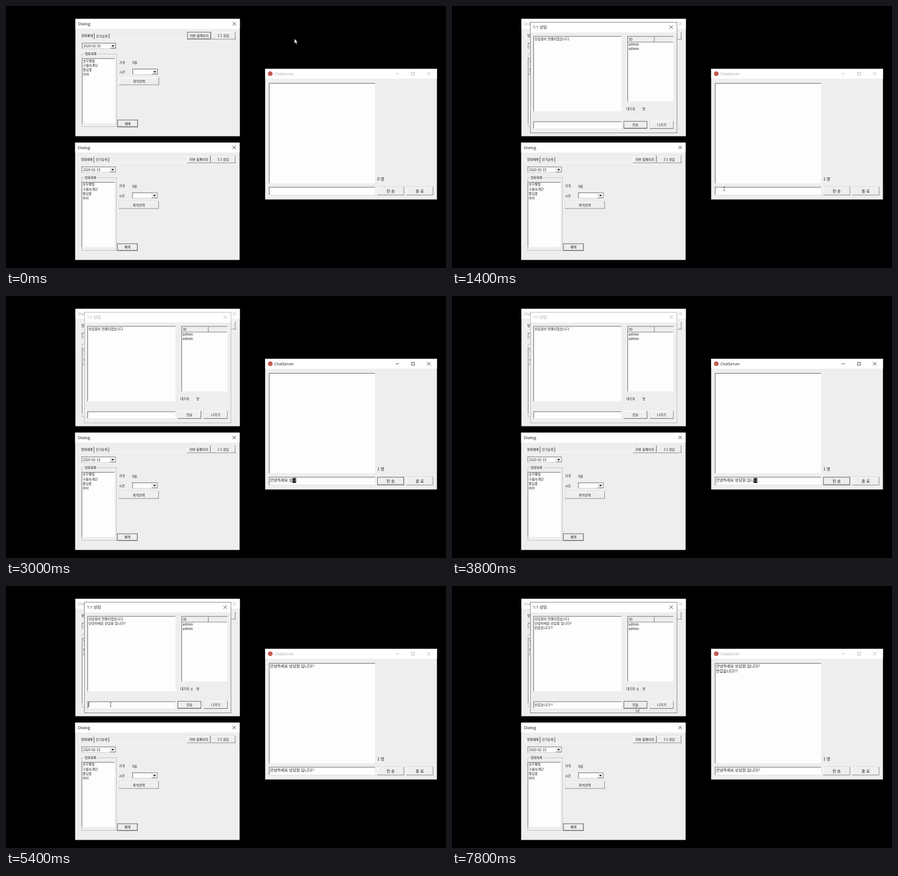
Write an HTML page that moves like this. It is 800 px wide and 476 px high and loops after 8 s.

```html
<!DOCTYPE html>
<html lang="ko">
<head>
<meta charset="utf-8">
<title>Chat windows</title>
<style>
  html, body { margin: 0; width: 100%; height: 100%; overflow: hidden; background: #000; }
  svg { display: block; width: 100%; height: 100%; }
  text { font-family: 'Noto Sans CJK KR', 'Noto Sans CJK', sans-serif; white-space: pre; }
  .title { font-family: 'Open Sans', 'Noto Sans CJK KR', sans-serif; }
</style>
</head>
<body>
<svg id="stage" viewBox="0 0 800 476"></svg>
<script>
const STEP = 200, STEPS = 40;
const FACE = '#eee', INK = '#1a1a1a', EDGE = '#6b6b6b', FADED = '#a5a5a5';
const SMALL = 5.9, LARGE = 7.1;
const GREETING = '안녕하세요 상담원 입니다!!', REPLY = '반갑습니다!!!';

// Typed text by step; "true" marks a highlighted last syllable.
const greetingKeys = [
  [11, 'ㅇ', true], [12, '안', true], [13, '안녕', true], [14, '안녕하세', true],
  [15, '안녕하세요 상다', true], [16, '안녕하세요 상담원', true], [17, '안녕하세요 상담원 이', true],
  [18, '안녕하세요 상담원 입니', true], [19, '안녕하세요 상담원 입니다', true],
  [20, '안녕하세요 상담원 입니다!'], [21, GREETING]
];
const replyKeys = [
  [30, 'ㅂ', true], [31, '반가', true], [32, '반갑스', true], [33, '반갑습니', true],
  [34, '반갑습니다', true], [35, '반갑습니다!!'], [36, REPLY]
];
// Pointer waypoints as [step, x, y]; hidden while typing.
const pointerPaths = [
  { shape: 'arrow', points: [[0, 524.5, 59.5], [2, 400, 54], [3, 400, 54], [6, 503, 348]] },
  { shape: 'beam', points: [[7, 495, 332], [10, 495, 332]] },
  { shape: 'arrow', points: [[21, 719, 359], [23, 710, 342], [24, 710, 342], [25, 430, 272]] },
  { shape: 'beam', points: [[26, 190.5, 215.5], [29, 190.5, 215.5]] },
  { shape: 'arrow', points: [[36, 388, 211], [38, 335, 219.5], [39, 335, 219.5]] }
];

const rect = (x, y, w, h, fill) =>
  `<rect x="${x}" y="${y}" width="${w}" height="${h}" fill="${fill}"/>`;
const path = (d, attrs) => `<path d="${d}" ${attrs}/>`;
const text = (x, y, str, size = SMALL, fill = INK, attrs = '') =>
  `<text x="${x}" y="${y}" font-size="${size}" fill="${fill}" ${attrs}>${str}</text>`;
const title = (x, y, str, size, active) =>
  text(x, y, str, size, active ? INK : FADED, 'class="title"');

const frame = (x, y, w, h, color) =>
  rect(x, y, w, 1, color) + rect(x, y + h - 1, w, 1, color) +
  rect(x, y, 1, h, color) + rect(x + w - 1, y, 1, h, color);

const sunken = (x, y, w, h) =>
  rect(x, y, w, h, '#fdfdfd') + rect(x, y, w, 1, EDGE) + rect(x, y, 1, h, EDGE);

const raised = (x, y, w, h) =>
  rect(x, y, w, h, EDGE) + rect(x, y, w - 1, h - 1, '#fff') + rect(x + 1, y + 1, w - 2, h - 2, FACE);

const button = (x, y, w, h, label, isDefault, size = SMALL) =>
  raised(x, y, w, h) +
  (isDefault ? frame(x, y, w, h, EDGE) + rect(x + 1, y + h - 2, w - 2, 1, '#aaa') : '') +
  text(x + w / 2, y + h / 2 + size * .36, label, size, INK, 'text-anchor="middle"');

function combo(x, y, w, label) {
  const cx = x + w - 5.5;
  return sunken(x, y, w, 11) + rect(x, y + 10, w, 1, '#ccc') + raised(x + w - 10, y + 1, 10, 9) +
    path(`M${cx - 2.5} ${y + 4.5}h5l-2.5 2.8z`, 'fill="#000"') + text(x + 2.5, y + 8, label, 6.2);
}

const closeMark = (x, y, active) =>
  path(`M${x - 3} ${y - 3}l6 6m0-6l-6 6`, `stroke="${active ? INK : FADED}" stroke-width=".8" fill="none"`);

const windowBox = (x, y, w, h, titleHeight) =>
  rect(x, y, w, h, FACE) + rect(x, y, w, titleHeight, '#fff');

const advance = (str, size) => size *
  [...str].reduce((sum, c) => sum + (c === ' ' ? .224 : c === '!' ? .325 : .92), 0);

function typed(x, y, size, key) {
  if (!key) return '';
  const [, str, composing] = key;
  if (!composing) return text(x, y, str, size);
  const head = str.slice(0, -1), last = str.slice(-1), at = x + advance(head, size);
  return text(x, y, head, size) + rect(at, y - size * .94, advance(last, size), size * 1.25, '#000') +
    text(at, y, last, size, '#fff');
}

const latest = (keys, step) => keys.filter(k => k[0] <= step).pop();

function bookingDialog(dx, dy, active, focused) {
  const films = ['호두별빛', '구름속계단', '돌담꽃', '아아'];
  return `<g transform="translate(${dx} ${dy})">` +
    windowBox(126.2, 23.4, 299, 213.2, 18) +
    title(131, 35, 'Dialog', 7.6, active) + closeMark(415.3, 32.3, active) +
    rect(134, 49, 1, 11, '#fff') + rect(188, 59, 230, 1, '#fafafa') + rect(417, 59, 1, 2, '#bbb') +
    text(136.7, 56, '영화예매', 5.8) + rect(160, 49, 1, 11, '#555') +
    text(163.8, 56.5, '인기순위', 5.8) + rect(187, 50, 1, 9, '#555') +
    button(329.5, 47, 43, 13.5, '리뷰 홈페이지', focused) + button(373.7, 47, 43.5, 13.5, '1:1 상담') +
    combo(138, 67, 62, '2020-02-15') +
    frame(139, 88, 64, 133, '#fff') + frame(138, 87, 64, 133, '#b8b8b8') +
    rect(142, 85, 25, 5, FACE) + text(143.5, 89, '영화목록', 5.8) +
    sunken(138, 95, 60, 118) +
    films.map((film, i) => text(140, 101.5 + i * 8.3, film)).join('') +
    text(206, 104.5, '가격', 5.7) + text(230, 104.8, '0원') +
    text(206, 121.8, '시간', 5.7) + combo(230, 114, 46, '') +
    button(206, 130, 72.2, 13.5, '좌석선택') + button(202.7, 206.7, 37, 13.5, '예매', true) +
    '</g>';
}

function chatDialog(step, active) {
  const lines = [[4, '상담원이 연결되었습니다.'], [24, GREETING], [38, REPLY]];
  return windowBox(142, 29, 267.5, 202, 19) + frame(142, 29, 267.5, 202, active ? '#888' : '#bbb') +
    title(147, 41.3, '1:1 상담', 7.3, active) + closeMark(398.5, 38.5, active) +
    sunken(148, 54.7, 160, 136.5) +
    lines.filter(l => l[0] <= step).map((l, i) => text(150, 61.5 + i * 8, l[1], 6)).join('') +
    sunken(319, 54.7, 83.5, 118.5) + rect(320, 56, 82, 9, FACE) +
    rect(320, 65, 82, 1, '#888') + rect(367.3, 56, 1, 9, '#777') +
    text(322, 63, 'ID', 6.2) + text(321, 72, 'admin', 6.3) + text(321, 80.3, 'admin', 6.3) +
    text(317, 189.3, '대기자', 5.8) + (step >= 24 ? text(336, 189.5, '0', 6.2) : '') + text(346, 189.3, '명', 5.8) +
    sunken(148, 209.7, 160, 12.5) +
    button(312, 209, 43, 14, '전송', active) + button(359.7, 209, 43, 14, '나가기') +
    (active && step >= 26 && step < 30 ? rect(150, 211, 1, 9, '#222') : '') +
    typed(150, 217.5, 6, latest(replyKeys, step));
}

function serverWindow(step, active) {
  const color = active ? INK : FADED, count = step >= 4 ? 1 : 0;
  const lines = [[24, GREETING], [38, REPLY]];
  return windowBox(471.2, 114, 312.3, 237.5, 18) +
    '<circle cx="480.5" cy="123" r="4.3" fill="#c45a50"/>' +
    title(488, 125.7, 'ChatServer', 6.9, active) +
    path('M708.5 123h6M737.4 120.4h5.2v5.2h-5.2z', `stroke="${color}" stroke-width=".8" fill="none"`) +
    closeMark(768.5, 123, active) +
    sunken(478, 140, 193, 182) +
    lines.filter(l => l[0] <= step).map((l, i) => text(480, 148 + i * 8.7, l[1], LARGE)).join('') +
    text(675, 317.3, count + ' 명', 7.3) +
    sunken(478, 328.7, 193, 15) + rect(478, 343, 193, 1, '#ddd') +
    button(675, 328.7, 48.7, 15, '전 송', active, LARGE) + button(728, 328.7, 48.7, 15, '종 료', false, LARGE) +
    (active && step < 11 ? rect(480, 331, 1, 9, '#222') : '') +
    typed(480, 337.3, LARGE, latest(greetingKeys, step));
}

function pointer(step) {
  const route = pointerPaths.find(({ points }) => step >= points[0][0] && step <= points[points.length - 1][0]);
  if (!route) return '';
  const i = Math.max(1, route.points.findIndex(p => p[0] >= step));
  const [s0, x0, y0] = route.points[i - 1], [s1, x1, y1] = route.points[i];
  const k = (step - s0) / (s1 - s0);
  const x = x0 + (x1 - x0) * k, y = y0 + (y1 - y0) * k;
  return route.shape === 'arrow'
    ? path(`M${x} ${y}v8.5l1.9-1.7 1.3 3.1 1.5-.6-1.3-3h2.5z`, 'fill="#fff" stroke="#222" stroke-width=".6"')
    : path(`M${x - 1.5} ${y - 3.7}h3m-1.5 0v7.4m-1.5 0h3`, 'fill="none" stroke="#444" stroke-width=".7"');
}

function draw(step) {
  const chatOpen = step >= 3, serverActive = step >= 8 && step < 26;
  return rect(0, 0, 800, 476, '#000') +
    bookingDialog(0, 0, !chatOpen, true) +
    bookingDialog(-.5, 224.8, true, false) +
    (chatOpen ? chatDialog(step, !serverActive) : '') +
    serverWindow(step, serverActive) +
    pointer(step);
}

const stage = document.getElementById('stage');
let shown = -1;
function tick() {
  const step = Math.floor(performance.now() / STEP) % STEPS;
  if (step !== shown) stage.innerHTML = draw(shown = step);
  requestAnimationFrame(tick);
}
tick();
</script>
</body>
</html>
```
